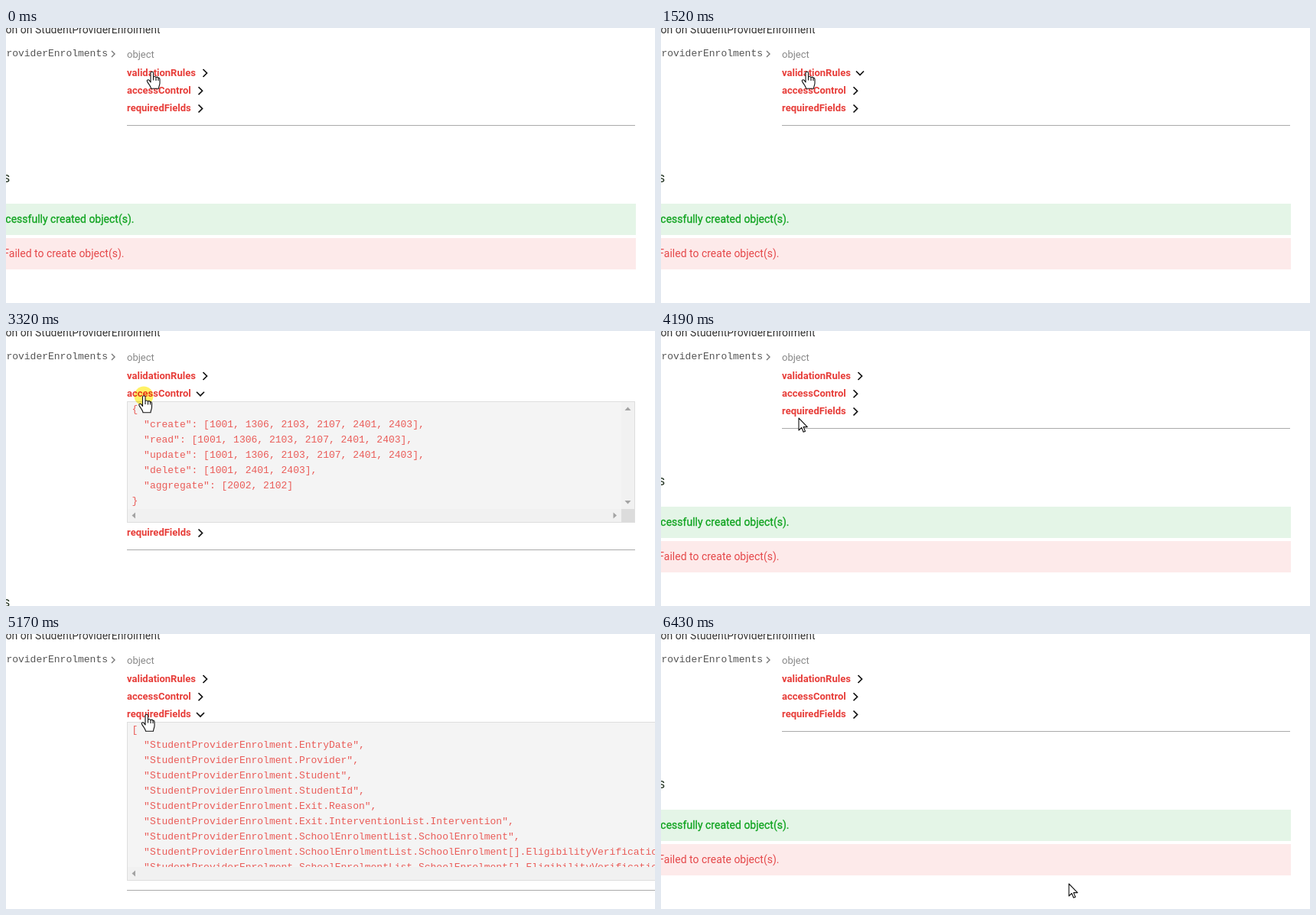
An HTML page for the animation above (6.51 s loop, 848 px wide and 360 px high).

```html
<!DOCTYPE html>
<html lang="en">
<head>
<meta charset="utf-8">
<title>Object validation</title>
<style>
html, body { margin: 0; width: 100%; height: 100%; overflow: hidden; background: #fff; }
svg { display: block; width: 848px; height: 360px; }
text { font: 14px Roboto, sans-serif; white-space: pre; }
.label { font-size: 13px; font-weight: 700; fill: #e73d39; }
.mono { font: 13px "Liberation Mono", "Courier New", monospace; fill: #555; }
.code { fill: #ea5d59; }
.chev { fill: none; stroke: #111; stroke-width: 1.7; }
.cursor { fill: #fff; stroke: #111; stroke-width: 1.1; stroke-linejoin: round; }
#glow { fill: #fff266; mix-blend-mode: multiply; }
</style>
</head>
<body>
<svg id="stage" viewBox="0 0 848 360"></svg>
<script>
const LOOP = 6510;
const SPE = 'StudentProviderEnrolment';
const ROLES = '1001, 1306, 2103, 2107, 2401, 2403';
const LONG = 'SchoolEnrolmentList.SchoolEnrolment';

const sections = [
  { name: 'validationRules', chevX: 260, h: 208, w: 664, thumb: true, lines: [
    '{', '  "allOf": [', '    {', '      "anyOf": [',
    `        {"required": ["${SPE}RefId"]},`,
    `        {"required": ["${SPE}LocalId"]}`,
    '      ]', '    },', '    {', '      "properties": {'] },
  { name: 'accessControl', chevX: 254, h: 159, w: 664, lines: [
    '{', `  "create": [${ROLES}],`, `  "read": [${ROLES}],`, `  "update": [${ROLES}],`,
    '  "delete": [1001, 2401, 2403],', '  "aggregate": [2002, 2102]', '}'] },
  { name: 'requiredFields', chevX: 254, h: 208, w: 760, lines: ['[',
    ...['EntryDate', 'Provider', 'Student', 'StudentId', 'Exit.Reason',
      'Exit.InterventionList.Intervention', LONG,
      LONG + '[].EligibilityVerification', LONG + '[].EligibilityVerificationDate'
    ].map(f => `  "${SPE}.${f}",`)] }
];

// start, end, number of steps, section, opens
const clicks = [
  [160, 460, 5, 0, true], [1440, 2000, 8, 0, false],
  [2370, 2780, 6, 1, true], [3320, 3630, 5, 1, false],
  [4850, 5170, 5, 2, true], [5710, 6340, 9, 2, false]
];

// start, end, steps, first moving step, from, to
const moves = [
  [1440, 2000, 8, 3, [191, 57], [180.5, 84.5]],
  [3320, 3630, 5, 1, [180.5, 84.5], [180, 113]],
  [4190, 4520, 5, 0, [180, 114], [184, 105]],
  [5710, 6340, 9, 2, [184, 105], [482, 304]],
  [6430, LOOP, 2, 0, [533, 327], [533, 327]]
];

const rect = (x, y, w, h, fill, more = '') =>
  `<rect x="${x}" y="${y}" width="${w}" height="${h}" fill="${fill}" ${more}/>`;
const label = (x, y, s, attrs = '') => `<text x="${x}" y="${y}" ${attrs}>${s}</text>`;
const tri = (x, y, turn, fill) =>
  `<path d="M-4 2L0 -2.5L4 2Z" fill="${fill}" transform="translate(${x} ${y}) rotate(${turn})"/>`;

function panel(s, i) {
  const h = s.h, r = s.w - 18, b = h - 18;
  const rows = s.lines.map((line, k) => {
    const text = line.trimStart();
    return label(6.5 + (line.length - text.length) * 7.8, 14 + 20 * k, text, 'class="mono code"');
  }).join('');
  return `<g id="panel${i}" transform="translate(158 ${69 + 23 * i})">` +
    rect(0.5, 0.5, s.w - 1, h - 1, '#f4f4f4') +
    `<clipPath id="clip${i}">${rect(1, 1, r, b - 1, '#000')}</clipPath>` +
    `<g clip-path="url(#clip${i})">${rows}</g>` +
    rect(r, 1, 17, b - 1, '#f1f1f1') + rect(1, b, r - 1, 17, '#f1f1f1') +
    rect(r, b, 17, 17, '#dcdcdc') +
    (s.thumb ? rect(r + 2, 18, 13, 23, '#c1c1c1') : '') +
    tri(r + 8.5, 10, 0, '#a3a3a3') +
    tri(r + 8.5, b - 9, 180, s.thumb ? '#505050' : '#a3a3a3') +
    tri(9, b + 8.5, -90, '#a3a3a3') + tri(r - 8.5, b + 8.5, 90, '#a3a3a3') +
    rect(0.5, 0.5, s.w - 1, h - 1, 'none', 'stroke="#dedede"') + '</g>';
}

const end = 'text-anchor="end"';
document.getElementById('stage').innerHTML =
  rect(0, 0, 848, 360, '#fff') +
  label(201.5, 7, `ion on ${SPE}`, `${end} fill="#333"`) +
  label(133, 37, 'roviderEnrolments', `class="mono" ${end}`) +
  '<path class="chev" d="M138 30L142 34L138 38" style="stroke:#777;stroke-width:1.4"/>' +
  label(158, 39, 'object', 'style="font-size:13px" fill="#888"') +
  sections.map((s, i) => `<g id="row${i}">${label(158, 63 + 23 * i, s.name, 'class="label"')}` +
    `<path id="chev${i}" class="chev" d="M-2.5 -5L2.5 0L-2.5 5"/></g>`).join('') +
  sections.map(panel).join('') +
  '<g id="below">' +
  '<path id="rule" stroke="#aaa"/>' +
  label(5.3, 202, 'Results', `${end} style="font-size:18px" fill="#2b3b2b"`) +
  rect(0, 230, 823, 41, '#e4f5e7') + rect(0, 275, 823, 41, '#fdeaea') +
  label(167.5, 255, 'Successfully created object(s).', `${end} fill="#0fa31f" stroke="#0fa31f" stroke-width=".3"`) +
  label(154.5, 300, 'Failed to create object(s).', `${end} fill="#e5484a"`) + '</g>' +
  '<circle id="glow" r="12.5"/>' +
  '<path id="hand" class="cursor" d="M-2 14V2C-2 -.4 1.5 -.4 1.5 2V8C1.5 6 5 6 5 8.3C5 6.5 8 6.8 8 9' +
  'C8 7.6 10 8 10 10.3V15C10 18 8.5 19 8.5 22.3H-1.5C-1.5 19.5 -5 16 -6.5 13C-7.5 11 -5 10 -3.7 11.7Z' +
  'M1.5 8V11.5M5 8.3V12M8 9V12"/>' +
  '<path id="arrow" class="cursor" d="M0 0V16L3.7 12.5L6.1 18.2L8.5 17.2L6.1 11.6H11.3Z"/>';

const $ = id => document.getElementById(id);
const show = (id, on) => $(id).setAttribute('visibility', on ? 'visible' : 'hidden');
const place = (id, x, y, turn = 0) =>
  $(id).setAttribute('transform', `translate(${x} ${y}) rotate(${turn})`);
const clamp = v => Math.max(0, Math.min(1, v));

// index of the current step, -1 before the start
const stepAt = (t, a, b, n) =>
  t < a ? -1 : Math.min(n - 1, Math.floor((t - a) * (n - 1) / (b - a) + 0.01));

function cursorAt(t) {
  let pos = [191, 57];
  for (const [a, b, n, first, from, to] of moves) {
    const k = stepAt(t, a, b, n);
    if (k < first) continue;
    const p = clamp((k - first) / (n - 1 - first));
    const e = p * p * (3 - 2 * p) * 0.4 + p * 0.6;
    pos = from.map((v, i) => v + (to[i] - v) * e);
  }
  return pos;
}

function draw(t) {
  const open = [false, false, false], turn = [0, 0, 0];
  let glow = false;
  for (const [a, b, n, i, opens] of clicks) {
    const k = stepAt(t, a, b, n);
    if (k === 0) glow = true;
    if (k < 1) continue;
    open[i] = opens;
    const e = 1 - (1 - clamp((k - 1) / 3)) ** 2;
    turn[i] = 90 * (opens ? e : 1 - e);
  }
  let shift = 0;
  sections.forEach((s, i) => {
    place('row' + i, 0, shift);
    place('chev' + i, s.chevX, 59 + 23.25 * i, turn[i]);
    show('panel' + i, open[i]);
    if (open[i]) shift += s.h;
  });
  place('below', 0, shift);
  $('rule').setAttribute('d', `M158 127.5H${open[2] ? 848 : 822}`);

  const [x, y] = cursorAt(t);
  const hand = y < 111;
  show('hand', hand);
  show('arrow', !hand);
  place(hand ? 'hand' : 'arrow', x, y);
  show('glow', glow);
  place('glow', x - 0.5, y + 0.5);
}

const t0 = performance.now();
function frame() {
  draw((performance.now() - t0) % LOOP);
  requestAnimationFrame(frame);
}
frame();
</script>
</body>
</html>
```
